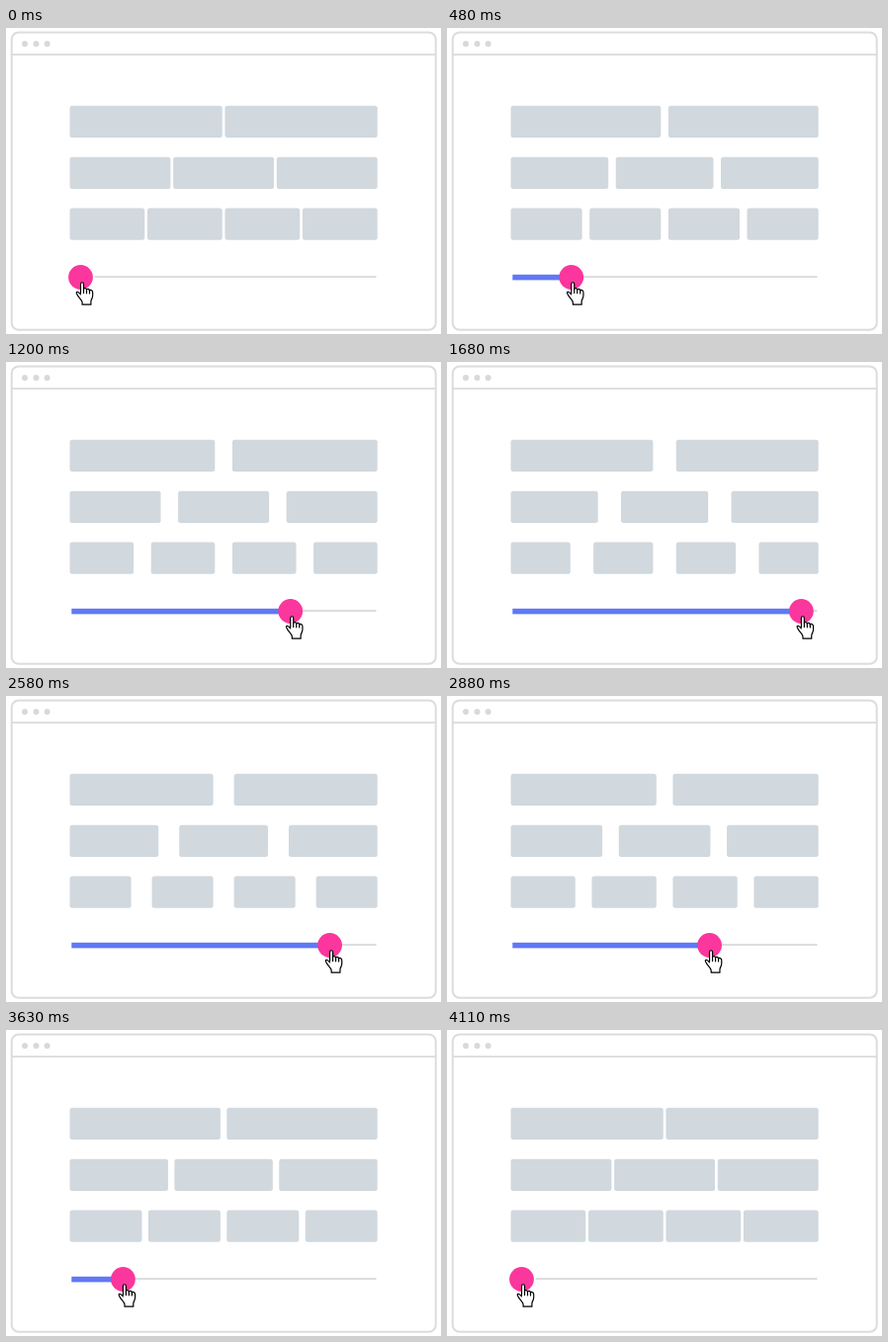
An HTML page with a canvas for the animation above (4350 ms loop, 440x310 px).

```html
<!DOCTYPE html>
<html lang="en">
<head>
<meta charset="utf-8">
<title>Gap slider</title>
<style>
  html, body { margin: 0; width: 100%; height: 100%; overflow: hidden; background: #fff; }
  canvas { display: block; width: 440px; height: 310px; }
</style>
</head>
<body>
<canvas id="stage"></canvas>
<script>
const LOOP = 4350, STEP = 30, MOVE = 1800, RETURN_AT = 2310;
const LEFT = 64.5, RIGHT = 375.7;
const KNOB = { from: 75.5, to: 362, y: 252.5, r: 12.4 };
const GAP = { from: 2.7, to: 24 };
const ROWS = [[2, 78.8], [3, 130.7], [4, 182.5]];
const GREY = '#d1d8de', LINE = '#dadcdd', BLUE = '#6078f6', PINK = '#fb369c';

const canvas = document.getElementById('stage');
const ctx = canvas.getContext('2d');
const ratio = window.devicePixelRatio || 1;
canvas.width = 440 * ratio;
canvas.height = 310 * ratio;
ctx.scale(ratio, ratio);

const hand = new Path2D(
  'M0 268.5V259.4C0 257.2 3 257.2 3 259.4V264.8C3.2 263 6 263.2 6 265.3' +
  'C6.3 263.8 9 264.1 9 266.2C9.4 265 12.2 265.3 12.2 267.8V271' +
  'C12.2 274 10.4 275 10.4 277.2V280.2H1.6V277.8C1.2 275.4-2 273.2-3.4 270.2' +
  'C-5.6 267.2-3.2 265.8 0 269.8');
const knuckles = new Path2D('M3 264.8V268.6M6 265.3V268.8M9 266.2V269');

// Easing curve with flat ends: cubic-bezier(x1, 0, x2, 1).
function bezier(x1, x2) {
  return x => {
    let low = 0, high = 1, u = x;
    for (let i = 0; i < 24; i++) {
      const v = 1 - u;
      if (3 * v * v * u * x1 + 3 * v * u * u * x2 + u ** 3 < x) low = u;
      else high = u;
      u = (low + high) / 2;
    }
    return u * u * (3 - 2 * u);
  };
}

const knobOut = bezier(1 / 3, 2 / 3), knobBack = bezier(1 / 6, 2 / 3);
const gapOut = bezier(1 / 6, 5 / 6), gapBack = bezier(0.1, 0.75);

const clamp = x => Math.min(1, Math.max(0, x));
const mix = (range, k) => range.from + (range.to - range.from) * k;

function progress(t, out, back) {
  return t < RETURN_AT ? out(clamp(t / MOVE)) : 1 - back(clamp((t - RETURN_AT) / MOVE));
}

function roundRect(x, y, w, h, r) {
  ctx.beginPath();
  ctx.roundRect(x, y, w, h, r);
}

function disc(x, y, r, color) {
  ctx.fillStyle = color;
  ctx.beginPath();
  ctx.arc(x, y, r, 0, Math.PI * 2);
  ctx.fill();
}

function drawWindow() {
  ctx.fillStyle = '#fff';
  ctx.fillRect(0, 0, 440, 310);
  ctx.strokeStyle = LINE;
  ctx.lineWidth = 2;
  roundRect(5.7, 4.5, 429, 301.3, 7);
  ctx.stroke();
  ctx.fillStyle = LINE;
  ctx.fillRect(6, 26, 428, 1.8);
  for (const x of [19, 30.5, 41.6]) disc(x, 16, 3, '#d7d9da');
}

function drawBlocks(gap) {
  ctx.fillStyle = GREY;
  for (const [count, y] of ROWS) {
    const width = (RIGHT - LEFT - gap * (count - 1)) / count;
    for (let i = 0; i < count; i++) {
      roundRect(LEFT + i * (width + gap), y, width, 32.2, 2.5);
      ctx.fill();
    }
  }
}

function drawSlider(x) {
  ctx.fillStyle = '#d5d8da';
  ctx.fillRect(89.5, 251.2, 285, 1.7);
  ctx.fillStyle = BLUE;
  ctx.fillRect(66.3, 249.8, x - 66.3, 5.6);
  disc(x, KNOB.y, KNOB.r, PINK);
}

function drawHand(x) {
  ctx.save();
  ctx.translate(x, 0);
  ctx.fillStyle = '#fff';
  ctx.strokeStyle = '#000';
  ctx.lineWidth = 1.2;
  ctx.lineJoin = ctx.lineCap = 'round';
  ctx.fill(hand);
  ctx.stroke(hand);
  ctx.stroke(knuckles);
  ctx.restore();
}

function draw(now) {
  const t = Math.floor((now % LOOP) / STEP) * STEP;
  const x = mix(KNOB, progress(t, knobOut, knobBack));
  drawWindow();
  drawBlocks(mix(GAP, progress(t, gapOut, gapBack)));
  drawSlider(x);
  drawHand(x);
}

const start = performance.now();
function tick() {
  draw(performance.now() - start);
  requestAnimationFrame(tick);
}
tick();
</script>
</body>
</html>
```
